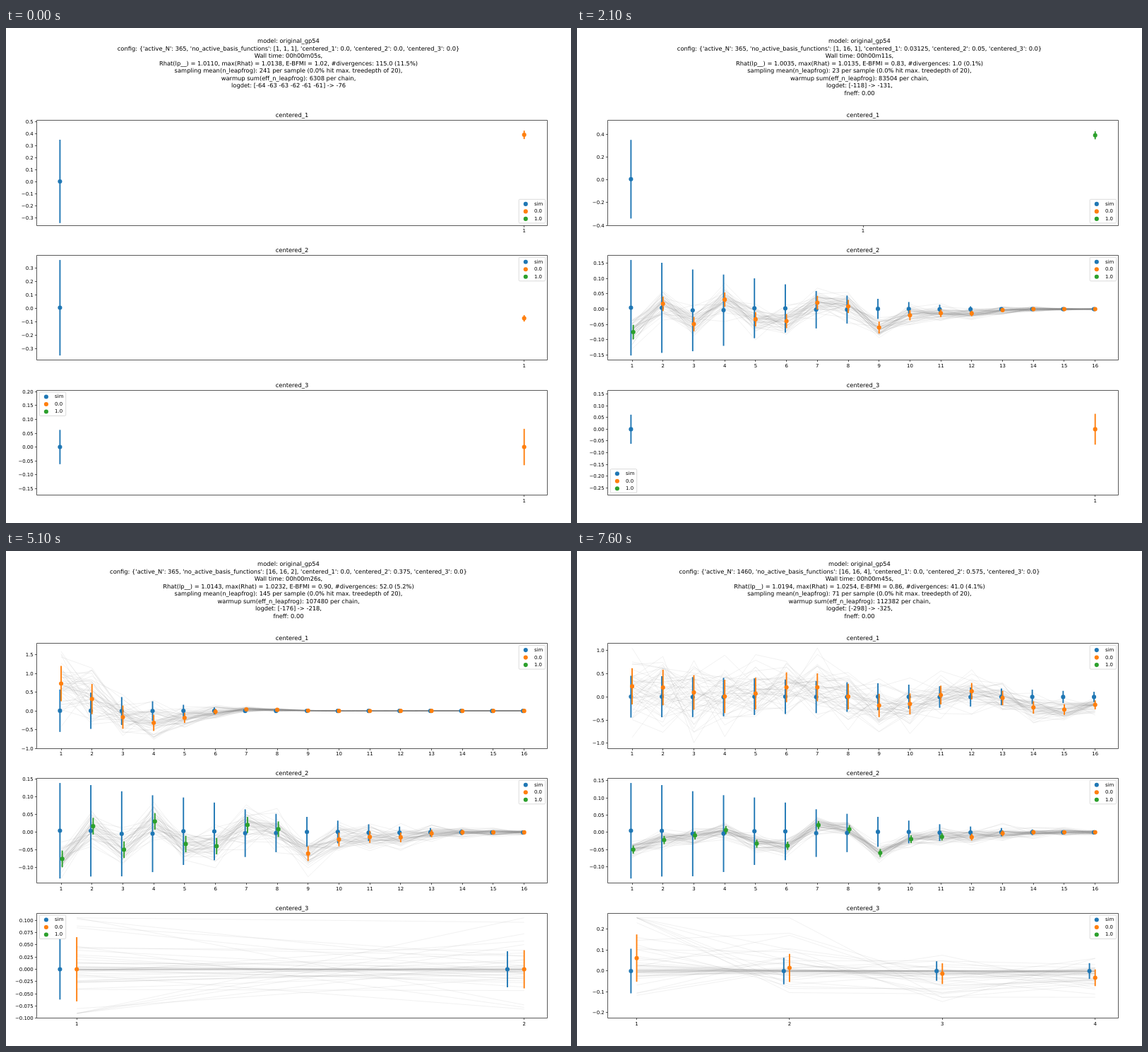
Write an HTML page that moves like this. It is 800 px wide and 700 px high and loops after 8 s.

```html
<!DOCTYPE html>
<html lang="en">
<head>
<meta charset="utf-8">
<title>Sampler runs</title>
<style>
  html, body { margin: 0; width: 100%; height: 100%; overflow: hidden; background: #fff; }
  svg { display: block; width: 800px; height: 700px; }
  text { font: 6.94px "DejaVu Sans", sans-serif; text-rendering: geometricPrecision; }
  .big { font-size: 8.33px; text-anchor: middle; }
  .mid { text-anchor: middle; }
  .end { text-anchor: end; }
  .axis { fill: none; stroke: #000; stroke-width: .65; }
  .draw { fill: none; stroke: #808080; stroke-opacity: .11; stroke-linejoin: round; }
  .box { fill: #fff; fill-opacity: .8; stroke: #ccc; stroke-width: .7; }
</style>
</head>
<body>
<svg id="stage" viewBox="0 0 800 700"></svg>
<script>
const LOOP = 8000, FIRST = 100, HOLD = 500, SCENES = 17;
const LEFT = 43.5, RIGHT = 766.5, X0 = 76.4, SPAN = 657.3, SHIFT = .0375;
const TOP = 130.6, PITCH = 190.7, HEIGHT = 148.6;
const BLUE = '#1f77b4', ORANGE = '#ff7f0e', GREEN = '#2ca02c';

// scene, seconds, rhat, max rhat, bfmi, divergences, percent, leapfrog, warmup, logdet from, to, fneff
const stats = [
  [0, 5, 1.0110, 1.0138, 1.02, 115, 11.5, 241, 6308, -64, -76, 0],
  [2, 7, 1.0095, 1.0097, 1.05, 66, 6.6, 64, 50936, -83, -94, 0],
  [5, 11, 1.0035, 1.0135, .83, 1, .1, 23, 83504, -118, -131, 0],
  [9, 21, 1.0260, 1.0438, .84, 43, 4.3, 138, 132124, -127, -199, 0],
  [12, 29, 1.0085, 1.0129, .93, 57, 5.7, 149, 95158, -200, -228, 0],
  [14, 32, 1.0130, 1.0285, .94, 80, 8.7, 52, 129591, -261, -259, .08],
  [16, 45, 1.0194, 1.0254, .86, 41, 4.1, 71, 112382, -298, -325, 0]
];
// scene, first panel low and high, third panel low and high, second panel sim sd
const views = [
  [0, -.36, .51, -.174, .206, .358],
  [2, -.373, .497, -.136, .303, .261],
  [5, -.401, .521, -.281, .167, .156],
  [9, -1.2, 2.41, -.54, .129, .126],
  [11, -1, 1.8, -.1, .115, .135],
  [12, -.98, 1.743, -.155, .244, .137],
  [14, -1.01, 1.95, -.214, .191, .141],
  [16, -1.11, 1.153, -.226, .278, .139]
];

const clamp = (v, lo, hi) => Math.min(hi, Math.max(lo, v));
const since = (i, ...starts) => starts.filter(s => i >= s).length;
const bump = (k, c, w) => Math.exp(-(((k - c) / w) ** 2));
const bell = a => k => Math.exp(-a * (k * k - 1));

function at(keys, i) {
  const b = keys.findIndex(key => key[0] >= i), q = keys[b];
  if (q[0] === i) return q;
  const p = keys[b - 1], u = (i - p[0]) / (q[0] - p[0]);
  return q.map((v, c) => p[c] + (v - p[c]) * u);
}

// How the first panel looks in each phase: sim sd, posterior sd, decay, mean.
const phases = [
  { sim: .345, post: .035, decay: 0, mean: () => .39 },
  { sim: .55, post: .52, decay: .03, mean: k => .46 * bump(k, 1.4, 1.1) - .42 * bump(k, 4.6, 1.65) },
  { sim: .565, post: .47, decay: .052, mean: k => .74 * Math.sin(.87 * (2.6 - k)) * bell(.052)(k) },
  {
    sim: .45, post: .39, decay: .0055,
    mean: k => .22 - .024 * k + .2 * Math.sin(Math.PI * k / 20) * Math.cos(Math.PI * (k - 1.1) / 2.72)
  }
];
const seasonal = [-.075, .0175, -.049, .031, -.033, -.039, .021, .009, -.06, -.02, -.013, -.014, -.003];
const ripple = k => k < 5 ? -.042 * Math.sin(Math.PI * k / 5) * (-1) ** k : 0;
const simMean = k => .0065 * Math.sin(Math.PI * (k / 2 - .25));

function makeRandom(seed) {
  let s = seed * 7919 + 17;
  const next = () => (s = (s * 16807) % 2147483647) / 2147483647;
  for (let i = 0; i < 5; i++) next();
  return () => Math.sqrt(-2 * Math.log(next())) * Math.cos(2 * Math.PI * next());
}

const text = (x, y, s, cls = '') => `<text x="${x}" y="${Math.round(y)}" class="${cls}">${s}</text>`;
const dot = (x, y, color) => `<circle cx="${x}" cy="${y}" r="3.05" fill="${color}"/>`;
const snap = v => Math.floor(v) + .5;

function header(i, { days, n, c1, c2 }) {
  const [, sec, rhat, maxR, bfmi, div, pct, leap, warm, from, to, fneff] = at(stats, i);
  const before = i ? Math.round(from) : '-64 -63 -63 -62 -61 -61';
  const lines = [
    'model: original_gp54',
    `config: {'active_N': ${days}, 'no_active_basis_functions': [${n.join(', ')}], 'centered_1': ${c1}, 'centered_2': ${c2}, 'centered_3': 0.0}`,
    `Wall time: 00h00m${String(Math.round(sec)).padStart(2, '0')}s,`,
    `Rhat(lp__) = ${rhat.toFixed(4)}, max(Rhat) = ${maxR.toFixed(4)}, E-BFMI = ${bfmi.toFixed(2)}, #divergences: ${Math.round(div)}.0 (${pct.toFixed(1)}%)`,
    `sampling mean(n_leapfrog): ${Math.round(leap)} per sample (0.0% hit max. treedepth of 20),`,
    `warmup sum(eff_n_leapfrog): ${Math.round(warm)} per chain,`,
    `logdet: [${before}] -&gt; ${Math.round(to)}${i ? ',' : ''}`
  ];
  if (i) lines.push(`fneff: ${fneff.toFixed(2)}`);
  return lines.map((s, k) => text(400, 21 + 10.5 * k, s, 'big')).join('');
}

function legend(top, corner) {
  const x = corner[1] === 'L' ? 47.3 : 726.2;
  const y = corner[0] === 'U' ? top + 2.9 : top + HEIGHT - 36.9;
  const rows = [['sim', BLUE], ['0.0', ORANGE], ['1.0', GREEN]];
  return `<rect class="box" x="${x}" y="${y}" width="37.4" height="33.6" rx="1.4"/>` +
    rows.map(([s, c], k) => dot(x + 9.6, y + 6.6 + 10.5 * k, c) + text(x + 21.8, y + 8.5 + 10.5 * k, s)).join('');
}

// Smallest round step that gives at most nine intervals.
function tickStep(span) {
  for (let p = -3; ; p++)
    for (const m of [1, 2, 2.5, 5])
      if (span / (m * 10 ** p) <= 9) return +(m * 10 ** p).toFixed(4);
}

function panel(p, { n, green, sim, post, lo, hi, corner, weight, seed }) {
  const top = TOP + PITCH * p, bottom = top + HEIGHT;
  const y0 = snap(top), y1 = snap(bottom);
  const unit = SPAN / (n - 1 + SHIFT * (green === n ? 2 : 1));
  const x = k => X0 + (k - 1 + SHIFT) * unit;
  const y = v => top + (hi - v) / (hi - lo) * HEIGHT;
  const pad = (hi - lo) * .045;
  let out = '', ticks = '';

  if (n > 1) {
    const gauss = makeRandom(seed);
    for (let j = 0; j < 50; j++) {
      const w = weight(j / 50);
      const pts = post.map(([m, sd], k) =>
        x(k + 1).toFixed(1) + ',' + y(clamp(w * (m + sd * gauss()), lo + pad, hi - pad)).toFixed(1));
      out += `<polyline class="draw" points="${pts.join(' ')}"/>`;
    }
  }

  const mark = (px, [m, sd], color) =>
    `<path d="M${px} ${y(m - sd)}V${y(m + sd)}" stroke="${color}" stroke-width="1.9"/>` + dot(px, y(m), color);
  sim.forEach((s, k) => out += mark(x(k + 1 - SHIFT), s, BLUE));
  post.forEach((s, k) => out += k < green ? mark(x(k + 1 + SHIFT), s, GREEN) : mark(x(k + 1), s, ORANGE));

  for (let k = 1; k <= n; k++) {
    ticks += `M${snap(x(k))} ${y1}v2.6`;
    out += text(x(k), bottom + 9.95, k, 'mid');
  }
  const step = tickStep(hi - lo), digits = (String(step).split('.')[1] || '').length;
  for (let i = Math.ceil(lo / step); i <= hi / step; i++) {
    const py = y(i * step);
    ticks += `M${LEFT} ${snap(py)}h-2.6`;
    out += text(38.7, py + 2.5, (i < 0 ? '\u2212' : '') + Math.abs(i * step).toFixed(digits), 'end');
  }
  return out + `<path class="axis" d="M${LEFT} ${y0}H${RIGHT}V${y1}H${LEFT}Z${ticks}"/>` +
    text(405, top - 4.17, `centered_${p + 1}`, 'big') + legend(top, corner);
}

function scene(i) {
  const scale = since(i, 12, 15), stage = since(i, 1, 6, 13, 16);
  const n = [i > 9 ? 16 : 2 ** clamp(i - 5, 0, 3), 2 ** clamp(i - 1, 0, 4), 2 ** since(i, 11, 14)];
  const solo = n[0] === 1;
  const [, lo1, hi1, lo3, hi3, s2] = at(views, i);
  const series = (count, mean, sd) => Array.from({ length: count }, (_, k) => [mean(k + 1), sd(k + 1)]);

  const phase = phases[since(i, 6, 10, 15)], fall1 = bell(phase.decay);

  const fall2 = bell(i < 9 ? .0195 : .0145), spread2 = k => s2 * fall2(k);
  const sims2 = series(n[1], k => simMean(k) * fall2(k), spread2);
  const ends = sims2.flatMap(([m, sd]) => [m - sd, m + sd]);
  const min = Math.min(...ends), max = Math.max(...ends), pad = (max - min) * .05;
  const noise = .024 / Math.sqrt(2 ** scale);

  const s3 = scale > 1 ? .107 : .062, fall3 = k => k ** -.75;

  return header(i, {
    days: 365 * 2 ** scale, n,
    c1: solo && i ? '0.03125' : '0.0',
    c2: ['0.0', '0.05', '0.375', '0.5', '0.575'][stage]
  }) +
    panel(0, {
      n: n[0], green: solo && i ? 1 : 0, lo: lo1, hi: hi1, corner: solo ? 'LR' : 'UR', weight: () => 1, seed: 3 * i + 1,
      sim: series(n[0], k => simMean(k) * fall1(k), k => phase.sim * fall1(k)),
      post: series(n[0], phase.mean, k => phase.post * fall1(k))
    }) +
    panel(1, {
      n: n[1], green: [0, 1, 8, 10, 11][stage], lo: min - pad, hi: max + pad, corner: 'UR', weight: () => 1, seed: 3 * i + 2,
      sim: sims2,
      post: series(n[1], k => (seasonal[k - 1] || 0) + (scale > 1 ? ripple(k) : 0),
        k => 1 / Math.hypot(1 / noise, 1 / spread2(k)))
    }) +
    panel(2, {
      n: n[2], green: 0, lo: lo3, hi: hi3, corner: ['UL', 'LL', 'UL', 'UR'][since(i, 5, 10, 13)],
      weight: u => 2.2 * u * u, seed: 3 * i + 3,
      sim: series(n[2], () => 0, k => s3 * fall3(k)),
      post: series(n[2], k => scale > 1 ? .062 - .068 * Math.log(k) : 0, k => 1.06 * s3 * fall3(k))
    });
}

const stage = document.getElementById('stage');
stage.innerHTML = Array.from({ length: SCENES }, (_, i) => `<g display="${i ? 'none' : 'inline'}">${scene(i)}</g>`).join('');
const scenes = [...stage.children];
const start = performance.now();
let shown = 0;

function tick() {
  const t = (performance.now() - start) % LOOP;
  const i = t < FIRST ? 0 : 1 + Math.floor((t - FIRST) / HOLD);
  if (i !== shown) {
    scenes[shown].setAttribute('display', 'none');
    scenes[i].setAttribute('display', 'inline');
    shown = i;
  }
  requestAnimationFrame(tick);
}
tick();
</script>
</body>
</html>
```
